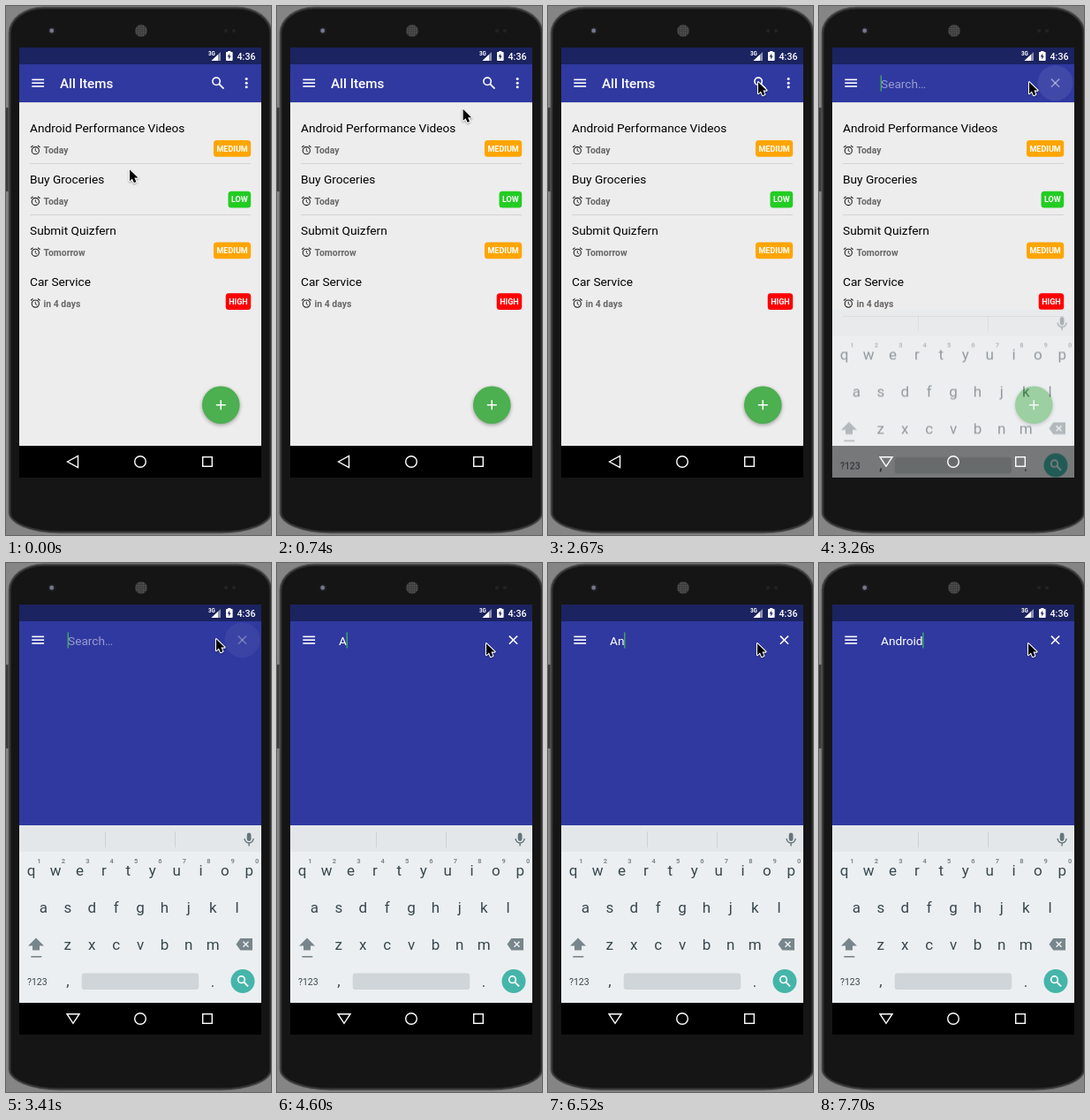
An HTML page with a canvas for the animation above (8 s loop, 300 px wide and 599 px high).

```html
<!DOCTYPE html>
<html lang="en">
<head>
<meta charset="utf-8">
<title>To-do list search</title>
<style>
html, body { margin: 0; width: 100%; height: 100%; overflow: hidden; background: #858585; }
canvas { display: block; width: 300px; height: 599px; }
</style>
</head>
<body>
<canvas id="stage"></canvas>
<script>
const W = 300, H = 599, LOOP = 8000;
const dpr = window.devicePixelRatio || 1;

function sized(canvas) {
  canvas.width = W * dpr;
  canvas.height = H * dpr;
  const c = canvas.getContext('2d');
  c.scale(dpr, dpr);
  return c;
}

const stage = sized(document.getElementById('stage'));
const layer = sized(document.createElement('canvas'));
let ctx = stage;

const BLUE = '#3039a0', WHITE = '#fff', KEY = '#37474f', KEY_GREY = '#78868c';
const LEFT = 15, WIDE = 274;       // screen column
const ROW = 57.8, KEY_STEP = 27.4;

const BEAT = 148.2;
const SEARCH = 22, KEYBOARD = 23, RIPPLE_END = 25, TYPING = 31;
const KEYS = 'A nr doi  <<<<d  ro id'; // one per beat; space waits, < deletes

// Pointer moves: first beat, last beat, x, y
const HOME = [139.5, 184];
const MOVES = [
  [0, 2, 177.5, 133], [3, 6, 226.5, 107], [8, 10, 191.5, 95],
  [10, 13, 240.5, 90], [17, 18, 237.5, 85], [24, 26, 236.5, 90]
];

const ITEMS = [
  ['Android Performance Videos', 'Today', 'MEDIUM'],
  ['Buy Groceries', 'Today', 'LOW'],
  ['Submit Quizfern', 'Tomorrow', 'MEDIUM'],
  ['Car Service', 'in 4 days', 'HIGH']
];
const BADGE = { MEDIUM: '#ffa500', LOW: '#22cc22', HIGH: '#ff0000' };

function typed(beat) {
  let str = '';
  for (const k of KEYS.slice(0, Math.max(0, beat - TYPING + 1))) {
    if (k === '<') str = str.slice(0, -1);
    else str += k.trim();
  }
  return str;
}

function pointerAt(beat) {
  return MOVES.reduce(([px, py], [from, to, x, y]) => {
    const p = Math.min(1, Math.max(0, (beat - from) / (to - from)));
    return [px + (x - px) * p, py + (y - py) * p];
  }, HOME);
}

function rect(x, y, w, h, color, r = 0) {
  ctx.fillStyle = color;
  ctx.beginPath();
  ctx.roundRect(x, y, w, h, r);
  ctx.fill();
}

function disc(x, y, r, color) {
  ctx.fillStyle = color;
  ctx.beginPath();
  ctx.arc(x, y, r, 0, Math.PI * 2);
  ctx.fill();
}

function ring(x, y, r, color, width, end = Math.PI * 2) {
  ctx.strokeStyle = color;
  ctx.lineWidth = width;
  ctx.beginPath();
  ctx.arc(x, y, r, 0, end);
  ctx.stroke();
}

function trace(points) {
  ctx.beginPath();
  points.forEach(([x, y], i) => i ? ctx.lineTo(x, y) : ctx.moveTo(x, y));
}

function line(points, color, width, close) {
  trace(points);
  if (close) ctx.closePath();
  ctx.strokeStyle = color;
  ctx.lineWidth = width;
  ctx.stroke();
}

function poly(points, color) {
  trace(points);
  ctx.fillStyle = color;
  ctx.fill();
}

function text(str, x, y, size, color, weight = 400, align = 'left') {
  ctx.font = `${weight} ${size}px Roboto, sans-serif`;
  ctx.textAlign = align;
  ctx.fillStyle = color;
  ctx.fillText(str, x, y);
}

function cross(x, y, s, color, width) {
  for (const d of [s, -s]) line([[x - s, y - d], [x + s, y + d]], color, width);
}

function magnifier(x, y, r, width) {
  ring(x, y, r, WHITE, width);
  line([[x + r * 0.75, y + r * 0.75], [x + r * 2, y + r * 2]], WHITE, width * 1.15);
}

function shell(inset, color) {
  const top = { x: 40 - inset, y: 30 - inset };
  const bottom = { x: 58 - inset, y: 24 - inset };
  rect(2.5 + inset, 0.5 + inset, 299 - 2 * inset, 597 - 2 * inset, color, [top, top, bottom, bottom]);
}

function drawPhone() {
  rect(0, 0, W, H, '#858585');
  rect(0, 115, 4, 95, '#3a3a3a', 1);
  shell(0, '#606060');
  shell(1, '#343434');
  shell(3, '#151515');
  disc(52, 28, 4, '#202024');
  disc(51.7, 28, 2.4, '#74778c');
  disc(153, 28, 7, '#3a3a3a');
  for (let i = -2; i <= 2; i++) {
    for (let j = -2; j <= 2; j++) {
      if (i * i + j * j < 7) disc(153 + i * 2.5, 28 + j * 2.5, 0.75, '#626262');
    }
  }
  for (const x of [249, 258]) disc(x, 28, 2.2, '#222');
}

function drawStatus() {
  rect(LEFT, 47, WIDE, 19, '#1b2360');
  text('3G', 229, 56, 6.3, WHITE, 700);
  poly([[243, 52], [243, 62], [232.5, 62]], '#8d91b0');
  poly([[240, 55], [240, 62], [232.5, 62]], WHITE);
  rect(251.2, 51, 3.2, 2, WHITE);
  rect(249, 52, 7.6, 10, WHITE, 0.8);
  poly([[253.3, 53.5], [250.7, 57.6], [252.4, 57.6], [252, 60.8], [254.7, 56.6], [253, 56.6]], '#1b2360');
  text('4:36', 261.5, 61, 10.7, WHITE, 500);
}

function drawToolbar(beat) {
  rect(LEFT, 66, WIDE, 43, BLUE);
  const mid = 87.2;
  for (const d of [-1, 0, 1]) rect(29.3, mid + d * 3.8 - 0.8, 13.8, 1.6, WHITE);
  if (beat >= SEARCH) {
    drawSearchField(beat, mid);
    return;
  }
  text('All Items', 61, 93.2, 15.2, WHITE, 500);
  magnifier(238.1, 85.3, 4.2, 1.6);
  for (const d of [-1, 0, 1]) disc(272.2, mid + d * 4.6, 1.5, WHITE);
}

function drawSearchField(beat, mid) {
  const str = typed(beat);
  const fade = beat < KEYBOARD ? 1 : 0.65;
  if (beat < RIPPLE_END) disc(267.5, mid, 20, `rgba(255,255,255,${0.08 * fade})`);
  cross(267.5, mid, 4.6, `rgba(255,255,255,${str ? 1 : 0.45 * fade})`, 1.5);
  text(str || 'Search…', 70, 92.6, 13.7, str ? WHITE : 'rgba(255,255,255,0.5)');
  const caretX = 70 + (str ? ctx.measureText(str).width : 0);
  const blinkOff = beat >= 25 && beat < 28;
  if (!blinkOff) rect(caretX - 0.4, 78.5, 1.4, 18, '#43a85a');
}

function alarm(x, y) {
  ring(x, y + 0.4, 4.1, '#222', 1.1);
  line([[x, y - 2], [x, y + 0.7], [x + 1.9, y + 2]], '#222', 0.9);
  for (const s of [-1, 1]) line([[x + s * 5.3, y - 3.2], [x + s * 2.7, y - 5.3]], '#222', 1.1);
}

function badge(level, right, y) {
  ctx.font = '700 9px Roboto, sans-serif';
  const w = ctx.measureText(level).width + 7;
  rect(right - w, y, w, 18.8, BADGE[level], 3.5);
  text(level, right - w / 2, y + 12.6, 9, WHITE, 700, 'center');
}

function drawList(beat) {
  rect(LEFT, 108, WIDE, 390, '#ededed');
  rect(LEFT, 109, WIDE, 1, '#dcdce2');
  ITEMS.forEach(([title, due, level], i) => {
    const y = ROW * i;
    text(title, 27, 143.1 + y, 13.7, '#000');
    alarm(33.3, 163.3 + y);
    text(due, 42.6, 167.4 + y, 10.4, '#686868', 700);
    badge(level, 277.2, 151.9 + y);
  });
  const rules = beat < SEARCH ? [0, 1] : [0, 1, 3];
  for (const i of rules) rect(27, Math.round(178 + ROW * i), 250, 1, '#d3d3d3');

  ctx.save();
  ctx.shadowColor = 'rgba(0,0,0,0.35)';
  ctx.shadowBlur = 4 * dpr;
  ctx.shadowOffsetY = 1.5 * dpr;
  disc(243.3, 451.7, 21.3, '#4caf50');
  ctx.restore();
  rect(237.8, 451, 11, 1.5, WHITE);
  rect(242.5, 446.3, 1.5, 11, WHITE);
}

function keyRow(keys, x, y, size = 17, color = KEY, weight = 400) {
  [...keys].forEach((k, i) => text(k, x + KEY_STEP * i, y, size, color, weight, 'center'));
}

function drawKeyboard() {
  rect(LEFT, 297, WIDE, 201, '#eceff1');
  rect(LEFT, 297, WIDE, 30, '#e4e7e9');
  for (const x of [112, 191]) rect(x, 304, 1, 18, '#cdd2d4');

  rect(272.7, 305.5, 4.8, 9.5, '#66757c', 2.4);
  ring(275.1, 312, 5, '#66757c', 1.4, Math.PI);
  rect(274.4, 317, 1.4, 3.5, '#66757c');

  keyRow('qwertyuiop', 28.7, 354.3);
  keyRow('1234567890', 37.5, 339.7, 7.5, '#7b888e', 700);
  keyRow('asdfghjkl', 42.4, 396.3);
  keyRow('zxcvbnm', 69.8, 438.3);

  poly([[34, 424.5], [43, 433.5], [38, 433.5], [38, 438.5], [30, 438.5], [30, 433.5], [25, 433.5]], KEY_GREY);
  rect(28.3, 445, 12, 1.6, KEY_GREY);
  poly([[260.5, 431.7], [265.3, 425], [279, 425], [279, 438.4], [265.3, 438.4]], KEY_GREY);
  cross(271.5, 431.7, 3, '#eceff1', 1.5);

  text('?123', 24, 477.5, 10.5, KEY);
  text(',', 70, 479, 17, KEY, 400, 'center');
  rect(85.7, 464.5, 132.5, 18.5, '#cfd5d8', 3);
  text('.', 234, 479.5, 17, KEY, 400, 'center');
  disc(268, 473.5, 13.5, '#45b5aa');
  magnifier(266.5, 471.7, 3.8, 1.6);
}

// Keyboard sliding in, faded as one sheet.
function drawRisingKeyboard() {
  ctx = layer;
  ctx.clearRect(0, 0, W, H);
  drawKeyboard();
  ctx = stage;
  ctx.globalAlpha = 0.5;
  ctx.drawImage(layer.canvas, 0, 46.5, W, H);
  ctx.globalAlpha = 1;
}

function drawNavIcons(beat) {
  const back = beat < SEARCH
    ? [[69.5, 516], [81.5, 509.5], [81.5, 522.5]]
    : [[69, 510.7], [83, 510.7], [76, 521.3]];
  line(back, WHITE, 1.4, true);
  ring(152, 516, 6.3, WHITE, 1.4);
  ctx.strokeRect(222.7, 510.7, 10.6, 10.6);
}

function drawScreen(beat) {
  ctx.save();
  ctx.beginPath();
  ctx.rect(LEFT, 47, WIDE, 487);
  ctx.clip();
  if (beat < KEYBOARD) drawList(beat);
  else rect(LEFT, 108, WIDE, 190, BLUE);
  drawStatus();
  drawToolbar(beat);
  rect(LEFT, 498, WIDE, 37, '#000');
  if (beat >= KEYBOARD) drawKeyboard();
  else if (beat >= SEARCH) drawRisingKeyboard();
  drawNavIcons(beat);
  ctx.restore();
}

function drawPointer(beat) {
  const [x, y] = pointerAt(beat);
  ctx.save();
  ctx.translate(x + 0.5, y + 0.7);
  ctx.scale(0.9, 0.9);
  trace([[0, 0.5], [0, 15], [3.3, 12], [5.5, 17.2], [8.2, 16], [6, 11], [10.6, 11]]);
  ctx.closePath();
  ctx.shadowColor = 'rgba(0,0,0,0.35)';
  ctx.shadowBlur = 2 * dpr;
  ctx.shadowOffsetY = dpr;
  ctx.lineJoin = 'round';
  ctx.strokeStyle = WHITE;
  ctx.lineWidth = 2.4;
  ctx.stroke();
  ctx.shadowColor = 'transparent';
  ctx.fillStyle = '#000';
  ctx.fill();
  ctx.restore();
}

const start = performance.now();

function frame() {
  const t = (performance.now() - start) % LOOP;
  const beat = Math.floor((t + 10) / BEAT);
  drawPhone();
  drawScreen(beat);
  drawPointer(beat);
  requestAnimationFrame(frame);
}
frame();
</script>
</body>
</html>
```
